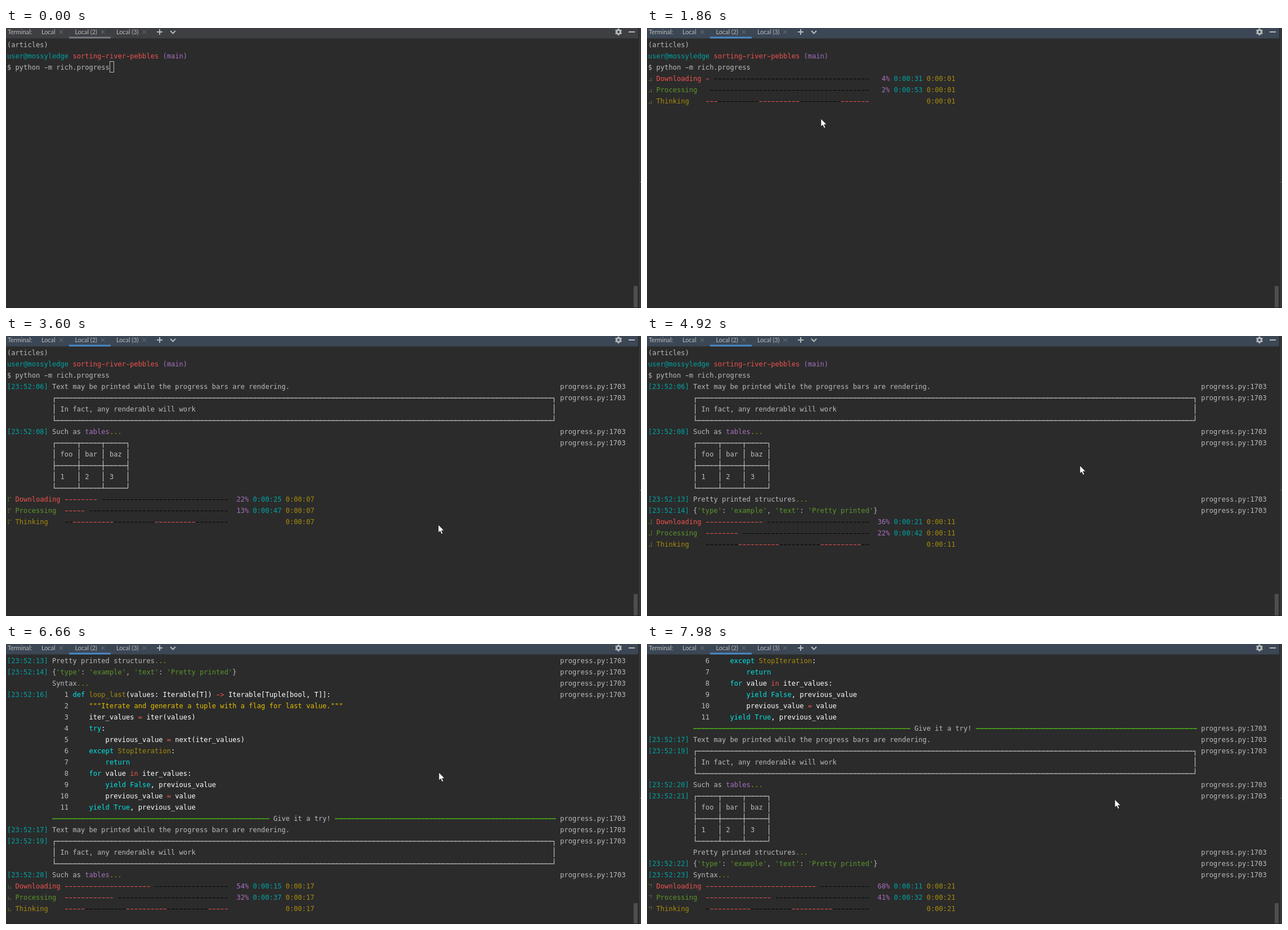
An HTML page with a canvas that plays this animation: 1128x497 px, repeating every 8 s.

```html
<!DOCTYPE html>
<html lang="en">
<head>
<meta charset="utf-8">
<title>Terminal progress</title>
<style>
html, body { margin: 0; width: 100%; height: 100%; overflow: hidden; background: #2b2b2b; }
canvas { display: block; }
</style>
</head>
<body>
<canvas id="stage" width="1128" height="497"></canvas>
<script>
const ctx = document.getElementById('stage').getContext('2d');
const LOOP = 8000, CELL = 7.276, LEFT = 2, TOP = 19, ROW = 20, ROWS = 23;
const FOCUS = 500, ENTER = 1340, START = 1478, TICK = 29.85;
const COLORS = {
  w: '#bbbbbb', W: '#ffffff', k: '#000000', r: '#f0524f', g: '#5c962c', y: '#a68a0d',
  m: '#a771bf', c: '#00a3a3', C: '#00e5e5', Y: '#e5bf00', G: '#4fc414'
};
const colX = c => LEFT + c * CELL;

// "§x" switches the colour; the result is a list of [character, colour] cells.
function parse(text) {
  return ('w' + text).split('§').flatMap(part => [...part.slice(1)].map(ch => [ch, part[0]]));
}

const bar = n => '─'.repeat(n);
const panel = ['┌' + bar(121) + '┐', '│ In fact, any renderable will work'.padEnd(122) + '│', '└' + bar(121) + '┘'];
const grid = (a, b, c) => a + [5, 5, 5].map(bar).join(b) + c;
const table = [grid('┌', '┬', '┐'), '│ foo │ bar │ baz │', grid('├', '┼', '┤'), '│ 1   │ 2   │ 3   │', grid('└', '┴', '┘')];
const plain = ['Text may be printed while the progress bars are rendering.'];
const such = ['Such as §mtables§y...'];
const pretty = ['Pretty printed structures§y...'];
const struct = ["{§g'type'§w: §g'example'§w, §g'text'§w: §g'Pretty printed'§w}"];
const syntax = ['Syntax§y...'];
const rule = ['§G' + bar(53) + '§w Give it a try! §G' + bar(54)];
const code = [
  '§Cdef §yloop_last§W(values: Iterable[T]) §r->§W Iterable[Tuple[bool, T]]:',
  '    §Y"""Iterate and generate a tuple with a flag for last value."""',
  '    §Witer_values §r=§W iter(values)',
  '    §Ctry§W:',
  '        §Wprevious_value §r=§W next(iter_values)',
  '    §Cexcept §yStopIteration§W:',
  '        §Creturn',
  '    §Cfor §Wvalue §rin§W iter_values:',
  '        §Cyield False§W, previous_value',
  '        §Wprevious_value §r=§W value',
  '    §Cyield True§W, previous_value'
].map((line, i) => String(i + 1).padStart(4) + ' ' + line);

// [time, clock second or 0 when unchanged, body]
const logs = [
  [2360, 6, plain], [2560, 0, panel], [3000, 8, such], [3140, 0, table],
  [4460, 13, pretty], [4760, 14, struct], [4980, 0, syntax], [5480, 16, code],
  [5580, 0, rule], [5760, 17, plain], [6350, 19, panel], [6600, 20, such],
  [6900, 21, table], [7060, 0, pretty], [7260, 22, struct], [7560, 23, syntax]
].map(([time, second, body]) => ({
  time,
  rows: body.map((line, i) => {
    const stamp = !i && second ? `§c[23:52:${String(second).padStart(2, '0')}]§w ` : ' '.repeat(11);
    const cells = parse(stamp + line);
    if (i) return cells;
    while (cells.length < 135) cells.push([' ', 'w']);
    return cells.concat(parse('progress.py:1703'));
  })
}));

const prompt = [
  '(articles)',
  '§cuser@mossyledge §rsorting-river-pebbles §m(main)',
  '$ python -m rich.progress'
].map(parse);

const clock = s => '0:00:' + String(Math.max(0, s)).padStart(2, '0');

function taskRows(t) {
  const n = Math.floor((t - START) / TICK);
  const elapsed = n / 10;
  const spin = '§g' + '⠋⠙⠹⠸⠼⠴⠦⠧⠇⠏'[Math.floor(1.25 * n + 0.25) % 10] + ' ';
  const tail = ' §y' + clock(Math.floor(elapsed));
  const task = (label, color, rate, lag) => {
    const percent = rate * elapsed;
    const halves = Math.floor(percent * 0.8), full = halves >> 1;
    const gap = halves ? ' ' : '';
    const track = '§r' + '-'.repeat(full) + gap + '§k' + '-'.repeat(40 - full - gap.length);
    const left = n ? clock(Math.ceil((100 - percent) / rate - lag)) : '-:--:--';
    return parse(`${spin}§${color}${label.padEnd(12)}${track} §m${percent.toFixed(0).padStart(3)}% §c${left}${tail}`);
  };
  const shift = Math.floor(1.5 * n + 15.5) % 20;
  let pulse = '';
  for (let i = 0; i < 40; i++) pulse += ((i - shift + 20) % 20 < 10 ? '§r' : '§k') + '-';
  return [
    task('Downloading', 'r', 3.13, 0),
    task('Processing', 'g', 1.875, elapsed > 2 && elapsed < 4 ? 0.2 : 0),
    parse(spin + '§yThinking    ' + pulse + ' '.repeat(13) + tail)
  ];
}

// Pointer path: [time, x, y]
const path = [
  [160, 640, 480], [480, 330, 210], [900, 190, 72], [960, 170, 72], [1180, 186, 70], [1340, 186, 70],
  [1600, 270, 150], [1860, 309, 161], [2140, 180, 180], [2260, 4, 88], [2440, 115, 142],
  [2600, 125, 146], [2960, 560, 308], [3400, 768, 335], [3800, 768, 335], [4300, 769, 243],
  [4640, 769, 240], [4860, 769, 230], [6300, 769, 230], [6660, 769, 228], [7760, 769, 228],
  [7980, 831, 276]
];
function pointer(t) {
  if (t < path[0][0]) return null;
  const i = path.findIndex(p => p[0] > t);
  if (i < 0) return path.at(-1).slice(1);
  const [t0, x0, y0] = path[i - 1], [t1, x1, y1] = path[i];
  const u = (t - t0) / (t1 - t0), e = u * u * (3 - 2 * u);
  return [x0 + (x1 - x0) * e, y0 + (y1 - y0) * e];
}

// Selected range: [row, column, end row, end column]
function selection(t, mouse) {
  if (t >= 900 && t < 1160) return [2, 2, 3, 0];
  if (t >= 2260 && t < 2600) {
    return [3, 0, Math.floor((mouse[1] - 25) / ROW), Math.floor((mouse[0] - LEFT) / CELL)];
  }
  return null;
}

function rect(color, x, y, w, h) {
  ctx.fillStyle = color;
  ctx.fillRect(x, y, w, h);
}
function stroke(color, width, points) {
  ctx.strokeStyle = color;
  ctx.lineWidth = width;
  ctx.beginPath();
  points.forEach(([x, y]) => ctx.lineTo(x, y));
  ctx.stroke();
}

const BOX = { '─': 'lr', '│': 'ud', '┌': 'rd', '┐': 'ld', '└': 'ru', '┘': 'lu', '├': 'rud', '┤': 'lud', '┬': 'lrd', '┴': 'lru', '┼': 'lrud' };
function glyph(ch, x, y, color) {
  const arms = BOX[ch], code = ch.codePointAt(0);
  if (arms) {
    const cx = Math.round(x + CELL / 2 - 0.5), cy = y + 11;
    if (arms.includes('l')) rect(color, x, cy - 0.5, cx - x + 1, 1.3);
    if (arms.includes('r')) rect(color, cx, cy - 0.5, x + CELL - cx, 1.3);
    if (arms.includes('u')) rect(color, cx, y + 1.5, 1.2, 9.5);
    if (arms.includes('d')) rect(color, cx, cy, 1.2, 8.5);
  } else if (code > 0x2800 && code < 0x2900) {
    for (let i = 0; i < 6; i++) {
      if ((code >> i) & 1) rect(color, x + 1.5 + (i > 2 ? 3.4 : 0), y + 7 + (i % 3) * 3.2, 1.6, 1.6);
    }
  } else if (ch === '-') {
    rect(color, x + 1.2, y + 11, 5, 1);
  } else if (ch !== ' ') {
    ctx.fillStyle = color;
    ctx.fillText(ch, x, y + 15);
  }
}

function drawTerminal(t, mouse) {
  let rows = [...prompt];
  for (const log of logs) if (t >= log.time) rows.push(...log.rows);
  if (t >= START) rows.push(...taskRows(t));
  const scroll = Math.max(0, rows.length - ROWS);
  rows = rows.slice(scroll);

  const sel = selection(t, mouse);
  const isSelected = (r, c) => sel && (r > sel[0] || r === sel[0] && c >= sel[1]) &&
    (r < sel[2] || r === sel[2] && c < sel[3]);
  if (sel) {
    for (let r = sel[0]; r <= sel[2]; r++) {
      const x0 = colX(r === sel[0] ? sel[1] : 0);
      const x1 = r === sel[2] ? colX(sel[3]) : 1108;
      rect('#214283', x0, TOP + r * ROW, x1 - x0, ROW);
    }
  }
  ctx.font = '12.08px "DejaVu Sans Mono", "Noto Sans Mono", monospace';
  rows.forEach((cells, r) => cells.forEach(([ch, key], c) =>
    glyph(ch, colX(c), TOP + r * ROW, COLORS[isSelected(r, c) ? 'w' : key])));

  if (t < FOCUS) {
    ctx.strokeStyle = COLORS.w;
    ctx.lineWidth = 1;
    ctx.strokeRect(184.5, 59.5, 7, 19);
  } else if (t < ENTER) {
    if (Math.floor(t / 150) % 2 === 0) rect(COLORS.w, 184, 59, 7, 20);
  } else if (t < START) {
    rect(COLORS.w, LEFT, 79, 7, 20);
  }
  const thumb = scroll ? 460 : 458;
  rect('#4d4e4f', 1115, thumb, 7, 497 - thumb);
}

function drawHeader(focused) {
  rect(focused ? '#3c4755' : '#3d3f42', 0, 0, 1123, 18.5);
  rect(focused ? '#4a88c7' : '#747a80', 112, 15.5, 74, 3);
  ctx.font = '10.9px Lato, "Open Sans", sans-serif';
  ctx.fillStyle = COLORS.w;
  [['Terminal:', 3], ['Local', 63], ['Local (2)', 122.5], ['Local (3)', 196]].forEach(([s, x]) => ctx.fillText(s, x, 11));
  for (const x of [98, 172, 245.5]) {
    stroke('#73797e', 1, [[x - 3.5, 3.5], [x + 3.5, 10.5]]);
    stroke('#73797e', 1, [[x + 3.5, 3.5], [x - 3.5, 10.5]]);
  }
  const icon = '#b5b9bc';
  rect(icon, 268, 6, 10, 2);
  rect(icon, 272, 2, 2, 10);
  stroke(icon, 2, [[292, 5], [296.5, 9.5], [301, 5]]);
  rect(icon, 1106, 6, 11, 2);
  ctx.lineWidth = 3;
  ctx.beginPath();
  ctx.arc(1088, 7, 3.5, 0, 7);
  ctx.stroke();
  for (let i = 0; i < 6; i++) {
    const a = i * Math.PI / 3 + Math.PI / 6, dx = Math.cos(a), dy = Math.sin(a);
    stroke(icon, 2.6, [[1088 + 4 * dx, 7 + 4 * dy], [1088 + 6.2 * dx, 7 + 6.2 * dy]]);
  }
}

function drawPointer([x, y]) {
  ctx.beginPath();
  [[0, 0], [0, 14], [3.2, 11.2], [5.6, 16.6], [8, 15.6], [5.6, 10.4], [10, 10.2]]
    .forEach(([dx, dy]) => ctx.lineTo(x + dx, y + dy));
  ctx.closePath();
  ctx.fillStyle = '#fff';
  ctx.fill();
  ctx.strokeStyle = '#111';
  ctx.lineWidth = 0.7;
  ctx.stroke();
}

const begin = performance.now();
function draw() {
  const t = (performance.now() - begin) % LOOP;
  const mouse = pointer(t);
  rect('#2b2b2b', 0, 0, 1128, 497);
  drawTerminal(t, mouse);
  drawHeader(t >= FOCUS);
  rect('#252627', 1123, 0, 1, 497);
  rect('#343638', 1124, 0, 4, 497);
  rect('#8a8c8e', 1126, 273, 2, 1);
  rect('#222324', 0, 496, 1128, 1);
  if (mouse) drawPointer(mouse);
  requestAnimationFrame(draw);
}
draw();
</script>
</body>
</html>
```
